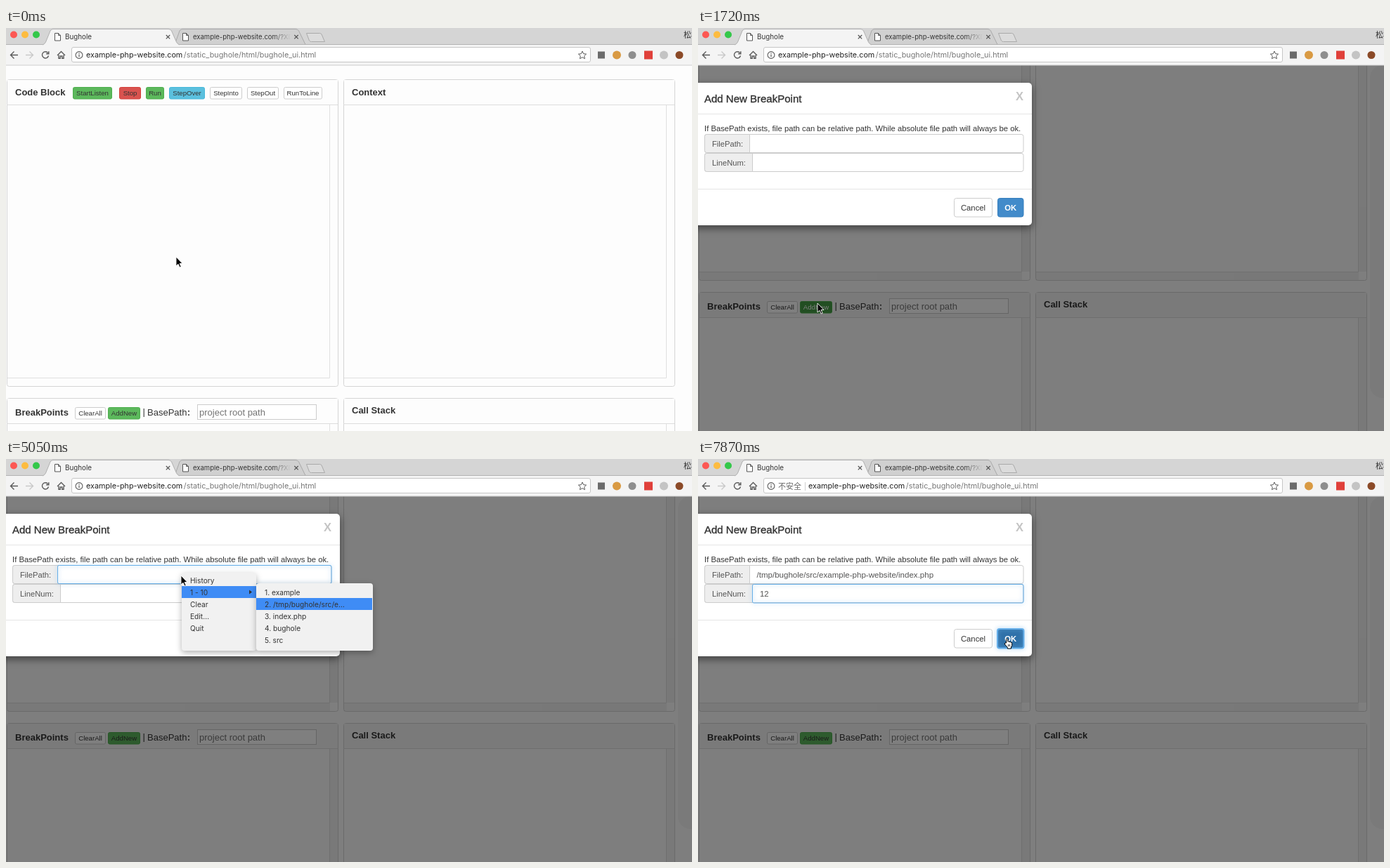
Write an HTML page that moves like this. It is 976 by 574 pixels and loops after 8 s.

```html
<!DOCTYPE html>
<html lang="en">
<head>
<meta charset="utf-8">
<title>Bughole</title>
<style>
  html, body { margin: 0; width: 100%; height: 100%; overflow: hidden; background: #fdfdfd; }
  svg { display: block; width: 976px; height: 574px; }
  text { font-family: "Liberation Sans", Arial, sans-serif; fill: #333; white-space: pre; }
  .ui { font-family: Inter, Roboto, sans-serif; }
  .cjk { font-family: "Noto Sans CJK SC", "Noto Sans CJK", sans-serif; }
  .b { font-weight: 700; }
  .mid { text-anchor: middle; }
  .line { fill: none; stroke: #5a5a5a; stroke-width: 1.4; }
  .ring { fill: none; stroke: #66afe9; filter: drop-shadow(0 0 3px rgba(102,175,233,.8)); }
  .box { filter: drop-shadow(0 4px 6px rgba(0,0,0,.5)); }
  .menu { filter: drop-shadow(0 3px 4px rgba(0,0,0,.3)); }
</style>
</head>
<body>
<svg id="stage" viewBox="0 0 976 574" xmlns="http://www.w3.org/2000/svg"></svg>
<script>
const rect = (x, y, w, h, fill, extra = '') =>
  `<rect x="${x}" y="${y}" width="${w}" height="${h}" fill="${fill}" ${extra}/>`;
const text = (x, y, size, str, extra = '') =>
  `<text x="${x}" y="${y}" font-size="${size}" ${extra}>${str}</text>`;
const path = (d, extra = 'class="line"') => `<path d="${d}" ${extra}/>`;
const dot = (x, y, r, fill, extra = '') => `<circle cx="${x}" cy="${y}" r="${r}" fill="${fill}" ${extra}/>`;
const group = (id, body, extra = '') => `<g id="${id}" ${extra}>${body}</g>`;

const pageIcon = x => path(`M${x} 7.5h5l3 3v7.5h-8zM${x + 5} 7.5v3h3`, 'fill="#fff" stroke="#555"');
const cross = x => path(`M${x - 2.7} 10l5.4 5.4m0-5.4l-5.4 5.4`, 'stroke="#555" stroke-width="1.2"');

function browser() {
  return rect(0, 0, 976, 24, '#d5d5d5')
    + dot(11, 9.5, 5, '#fc5753') + dot(27, 9.5, 5, '#fdbc40') + dot(43, 9.5, 5, '#34c84a')
    + path('M240 23.5L247 4Q248.500 1.500 251 1.500H412Q415 1.500 416.500 4L426 23.500z', 'fill="#d0d0d0" stroke="#a9a9a9"')
    + path('M427.500 7.500H446.500Q448 7.500 449 9L453.500 19.500H434.500Q432.500 19.500 431.500 18z', 'fill="#dcdcdc" stroke="#aaa"')
    + rect(0, 23, 976, 1, '#b2b2b2')
    + rect(0, 24, 976, 29, '#f4f4f4')
    + path('M52 24Q55 23 56.500 20L63 4Q64.500 1.500 67 1.500H231Q234 1.500 235.500 4L242.500 20Q244 23 247 24', 'fill="#f4f4f4" stroke="#b0b0b0"')
    + rect(53, 24, 193, 1, '#f4f4f4')
    + pageIcon(69.5) + text(84, 16.3, 9.8, 'Bughole', 'class="ui"') + cross(230.5)
    + pageIcon(251.5) + text(266, 16.3, 9.5, 'example-php-website.com/?XD', 'class="ui" fill="url(#fade)" style="fill:url(#fade)"')
    + cross(413) + text(964, 14, 11, '松林', 'class="cjk"')
    + path('M17 38.500H6.500M11.500 33.500L6.500 38.500L11.500 43.500')
    + path('M28 38.500H38.500M33.500 33.500L38.500 38.500L33.500 43.500', 'class="line" style="stroke:#c9c9c9"')
    + path('M59.700 35.500A4.600 4.600 0 1 0 60.500 39.500M60.800 33.300V36.800H57.200')
    + path('M73 39L78.500 33.500L84 39M75 38.500V43.300H77.200V40H79.800V43.300H82V38.500')
    + rect(93.5, 27.5, 738, 21, '#fff', 'rx="2.5" stroke="#c6c6c6"')
    + dot(104, 38.5, 4.9, 'none', 'stroke="#5a5a5a" stroke-width="1.1"')
    + rect(103.4, 37.6, 1.2, 3.6, '#5a5a5a') + rect(103.4, 35.4, 1.2, 1.3, '#5a5a5a')
    + path('M820 33L821.700 36.700L825.600 37.100L822.700 39.800L823.500 43.700L820 41.700L816.500 43.700L817.300 39.800L814.400 37.100L818.300 36.700z', 'class="line" style="stroke-width:1"')
    + group('insecure', text(114, 42.7, 11, '不安全', 'class="cjk" style="fill:#666"'))
    + rect(152, 33, 1, 12, '#d0d0d0', 'id="split"')
    + group('url', text(114, 42.4, 10.8, 'example-php-website.com', 'class="ui" style="fill:#222"')
      + text(252.8, 42.4, 10.8, '/static_bughole/html/bughole_ui.html', 'class="ui" style="fill:#777"'))
    + rect(842, 33.5, 10, 10, '#6b6b6b') + dot(869, 38.5, 6, '#d99a43')
    + dot(891, 38.5, 5.5, '#8e8e8e') + rect(908, 32.5, 12, 12, '#e0403a')
    + dot(936, 38.5, 6, '#c4c4c4') + dot(958, 38.5, 5.5, '#8b4a28')
    + rect(0, 52.5, 976, 1, '#cfcfcf');
}

function button(x, y, w, label, fill, edge, id = '') {
  return `<g ${id && `id="${id}"`}>` + rect(x + .5, y + .5, w - 1, 16.5, fill, `rx="2" stroke="${edge}"`)
    + text(x + w / 2, y + 12, 9.6, label, 'class="mid"') + '</g>';
}
const green = ['#5cb85c', '#4cae4c'], red = ['#d9534f', '#d43f3a'],
      blue = ['#5bc0de', '#46b8da'], plain = ['#fff', '#ccc'];

function panel(x, y, h) {
  return rect(x + .5, y + .5, 471, h, '#fdfdfd', 'rx="3" stroke="#d5d5d5"')
    + rect(x + 1, y + 1, 470, 35, '#f5f5f5', 'class="head"')
    + rect(x, y + 36, 471, 1, '#ddd')
    + path(`M${x + 459.5} ${y + 37}V${y + h - 11.5}H${x + 1}`, 'fill="none" stroke="#e0e0e0"')
    + group('', rect(x + 460, y + 37, 11, h - 49, '#000') + rect(x + 1, y + h - 11, 459, 11, '#000'), 'class="track" opacity=".04"');
}

function page() {
  return panel(1, 73, 437) + panel(480, 73, 437) + panel(1, 527, 437) + panel(480, 527, 437)
    + text(13, 96, 13, 'Code Block', 'class="b"') + text(492, 96, 13, 'Context', 'class="b"')
    + button(95, 84, 56, 'StartListen', ...green) + button(161, 84, 31, 'Stop', ...red)
    + button(199, 84, 26, 'Run', ...green) + button(232, 84, 51, 'StepOver', ...blue)
    + button(290, 84, 46, 'StepInto', ...plain) + button(343, 84, 45, 'StepOut', ...plain)
    + button(395, 84, 55, 'RunToLine', ...plain)
    + text(13, 552, 13, 'BreakPoints', 'class="b"') + text(492, 549, 13, 'Call Stack', 'class="b"')
    + button(98, 540, 44, 'ClearAll', ...plain) + button(145, 540, 46, 'AddNew', ...green, 'add')
    + text(194.5, 551, 13, '|') + text(201, 552, 13, 'BasePath')
    + dot(260, 545.8, 1, '#333') + dot(260, 551, 1, '#333')
    + rect(272.5, 536.5, 169, 21, '#fff', 'stroke="#ccc"')
    + text(275, 552, 13, 'project root path', 'style="fill:#757575"');
}

function field(y, split, label) {
  return rect(9.5, y + .5, 453.5, 26, '#fff', 'rx="3" stroke="#ccc"')
    + path(`M${split} ${y + .5}H12.500Q9.500 ${y + .5} 9.500 ${y + 3.5}V${y + 23.5}Q9.500 ${y + 26.5} 12.500 ${y + 26.5}H${split}z`, 'fill="#eee" stroke="#ccc"')
    + text(20, y + 17.5, 11.2, label, 'style="fill:#555"');
}

function dialog() {
  const caret = (id, x, y) => rect(x, y, 1, 13, '#222', `id="${id}"`);
  return rect(-20, 78, 495, 203, '#fff', 'rx="5" class="box"')
    + text(9, 105.5, 15, 'Add New BreakPoint', 'stroke="#333" stroke-width=".35"')
    + text(452, 103, 16.5, 'X', 'class="b" style="fill:#c4c4c4"')
    + rect(0, 122, 475, 1, '#e5e5e5') + rect(0, 229, 475, 1, '#e5e5e5')
    + text(9, 147, 11.27, 'If BasePath exists, file path can be relative path. While absolute file path will always be ok.')
    + field(151, 73.5, 'FilePath:') + field(178, 77.5, 'LineNum:')
    + rect(73.5, 151.5, 389.5, 26, 'none', 'rx="2" class="ring" id="fileRing"')
    + rect(77.5, 178.5, 385.5, 26.5, 'none', 'rx="2" class="ring" id="lineRing"')
    + text(83.5, 168.7, 11.55, '/tmp/bughole/src/example-php-website/index.php', 'id="file" style="fill:#555"')
    + text(88, 195.8, 11.4, '', 'id="num" style="fill:#555"')
    + caret('fileCaret', 84, 158) + caret('lineCaret', 88, 185)
    + rect(364.5, 242.5, 54, 26.5, '#fff', 'rx="3" stroke="#ccc"')
    + text(391.5, 260, 11.3, 'Cancel', 'class="mid"')
    + rect(426.5, 242.5, 36.5, 26.5, '#428bca', 'rx="3" stroke="#357ebd" id="ok"')
    + rect(426, 242, 37.5, 27.5, 'none', 'rx="3" class="ring" stroke-width="2" id="okRing"')
    + text(444.7, 260, 11.3, 'OK', 'class="mid b" style="fill:#fff"');
}

// Clipboard pop-up: a short menu with one nested list.
function menus() {
  const row = (x, i, str) => text(x, 193.500 + i * 17, 10.2, str, 'class="ui"');
  return group('menu', rect(250, 162, 106, 111, '#f1f1f1', 'rx="4" class="menu"')
      + rect(250, 181, 106, 17, '#3f8cf5', 'id="parent"')
      + ['History', '1 - 10', 'Clear', 'Edit…', 'Quit'].map((s, i) => row(262, i - 1, s)).join('')
      + path('M346 186.500l4 3l-4 3z', 'fill="#333"'))
    + group('list', rect(356, 177, 166, 96, '#f1f1f1', 'rx="4" class="menu"')
      + rect(356, 181, 165, 17, '#3f8cf5', 'id="pick"')
      + ['1. example', '2. /tmp/bughole/src/e…', '3. index.php', '4. bughole', '5. src'].map((s, i) => row(368, i, s)).join(''));
}

const pointer = group('arrow', path('M0 0V13L3 10.300L5.200 15L7.200 14.100L5.100 9.500H9z', 'fill="#000" stroke="#fff" stroke-width=".9"'))
  + group('hand', path('M2.600 7V1.600Q3.700 -.4 4.800 1.600V5Q6 4 7 5.500Q8.200 4.700 9 6.200Q10.500 5.700 10.700 7.500V10.500L9.500 13V15H4.300V13.300L.6 9Q-.4 7.300 1.200 7.100z', 'fill="#fff" stroke="#000"')
    + path('M5.500 9v3m2-3v3', 'stroke="#000" stroke-width=".8"'));

const stage = document.getElementById('stage');
stage.innerHTML = `<defs><clipPath id="view"><rect y="53" width="976" height="521"/></clipPath>
  <linearGradient id="fade" gradientUnits="userSpaceOnUse" x1="380" x2="405" y1="0" y2="0">
  <stop stop-color="#333"/><stop offset="1" stop-color="#333" stop-opacity="0"/></linearGradient></defs>`
  + rect(0, 0, 976, 574, '#fdfdfd')
  + group('', group('page', page()), 'clip-path="url(#view)"')
  + rect(0, 53, 976, 521, '#000', 'id="dim"')
  + rect(956, 53, 40, 474, '#000', 'rx="18" opacity=".035" id="edge"')
  + browser() + group('dialog', dialog()) + menus() + group('cursor', pointer);

// Each row holds until the next: [ms, changed values].
const steps = [
  [0, { scroll: 0, x: 242, y: 326, gray: 0, hover: 0, dim: 0, open: 0, file: 0, fileFocus: 0, lineFocus: 0,
        fileCaret: 0, lineCaret: 0, num: '', menu: 0, parent: 0, list: 0, pick: 0, shift: 0, hand: 0, okHover: 0, okFocus: 0 }],
  [450, { scroll: 18, gray: 1 }], [600, { scroll: 76 }], [750, { scroll: 128 }],
  [900, { scroll: 151, x: 236, y: 329 }], [1070, { x: 205, y: 340 }], [1270, { x: 177, y: 382 }],
  [1420, { x: 170, y: 392, hover: 1 }],
  [1570, { dim: .39 }], [1720, { dim: .5, open: 1 }],
  [2050, { hover: 0 }],
  [2530, { x: 181, y: 350 }], [2680, { x: 215, y: 250 }], [2830, { x: 242, y: 184 }], [2970, { x: 249, y: 166 }],
  [3260, { fileFocus: .6 }], [3410, { fileFocus: 1, fileCaret: 1 }], [3860, { fileCaret: 0 }],
  [4010, { menu: 1 }], [4160, { parent: 1 }], [4310, { list: 1, fileCaret: 1 }],
  [4750, { fileCaret: 0 }], [5050, { pick: 1 }],
  [5350, { menu: 0, list: 0 }], [5500, { file: 1 }],
  [5650, { shift: 15 }], [5790, { shift: 32 }],
  [5940, { shift: 41, fileFocus: .6, lineFocus: .55, lineCaret: 1 }],
  [6090, { shift: 43, fileFocus: 0, lineFocus: 1 }], [6390, { lineCaret: 0 }],
  [6690, { num: '1', lineCaret: 1 }], [6840, { num: '12' }],
  [7130, { x: 275, y: 178, lineCaret: 0 }], [7280, { x: 350, y: 215 }], [7430, { x: 418, y: 247 }],
  [7570, { x: 436, y: 255, hand: 1, okHover: 1 }], [7870, { okFocus: 1 }]
];

const el = id => document.getElementById(id);
const show = (id, v) => el(id).style.opacity = v;
const move = (id, x, y) => el(id).setAttribute('transform', `translate(${x} ${y})`);
const fill = (node, color) => node.style.fill = color;
const addBox = el('add').querySelector('rect'), addText = el('add').querySelector('text');
const heads = [...document.querySelectorAll('.head')], tracks = [...document.querySelectorAll('.track')];

function render(t) {
  const s = Object.assign({}, ...steps.filter(r => r[0] <= t).map(r => r[1]));
  move('page', 0, -s.scroll);
  move('cursor', s.x, s.y);
  move('url', s.shift, 0);
  heads.forEach(n => fill(n, s.gray ? '#f5f5f5' : '#fdfdfd'));
  tracks.forEach(n => n.style.opacity = s.open ? .04 : 0);
  fill(addBox, s.hover ? '#449d44' : '#5cb85c');
  fill(addText, s.hover ? '#fff' : '#333');
  show('dim', s.dim);
  show('edge', s.dim ? .035 : 0);
  move('edge', s.open ? 0 : 13, s.open ? 0 : -16);
  show('dialog', s.open);
  show('file', s.file);
  show('fileRing', s.fileFocus);
  show('lineRing', s.lineFocus);
  show('fileCaret', s.fileCaret);
  show('lineCaret', s.lineCaret);
  move('lineCaret', s.num.length * 6.4, 0);
  el('num').textContent = s.num;
  show('menu', s.menu);
  show('parent', s.parent);
  show('list', s.list);
  move('pick', 0, s.pick * 17);
  show('insecure', s.shift / 43);
  show('split', s.shift === 43 ? 1 : 0);
  show('arrow', 1 - s.hand);
  show('hand', s.hand);
  fill(el('ok'), s.okHover ? '#3071a9' : '#428bca');
  show('okRing', s.okFocus);
}

const start = performance.now();
function tick() {
  render((performance.now() - start) % 8000);
  requestAnimationFrame(tick);
}
tick();
</script>
</body>
</html>
```
